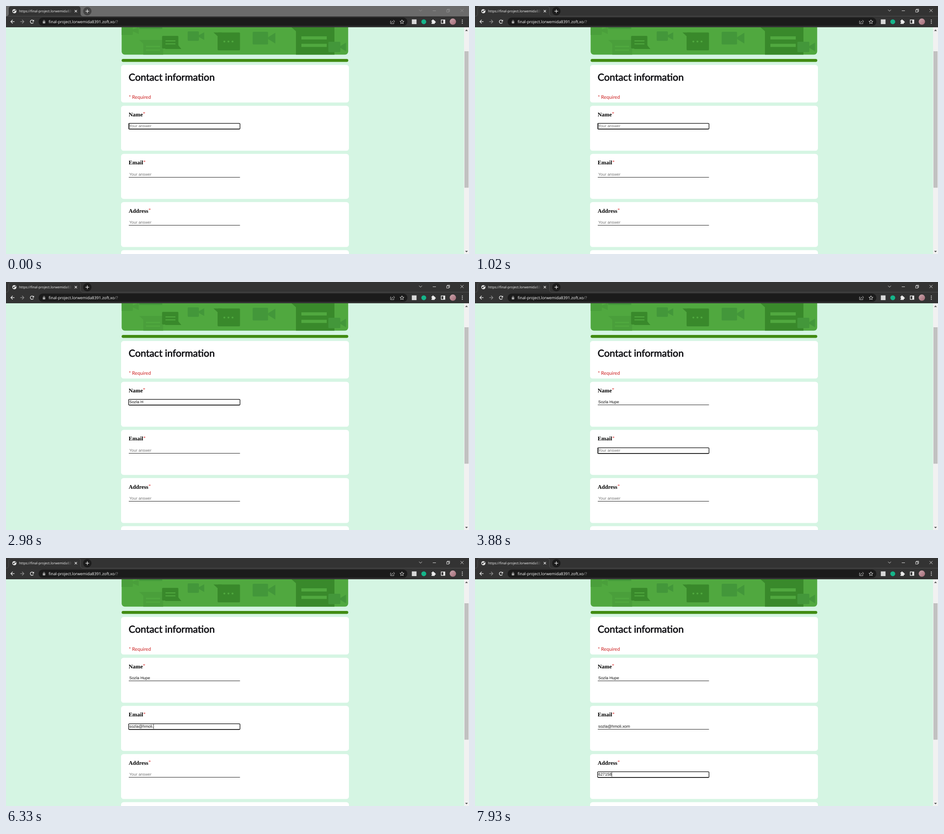
Recreate the animation shown at these times as an HTML page with a canvas. Size 1022 by 548 pixels, loop 8000 ms.

```html
<!DOCTYPE html>
<html lang="en">
<head>
<meta charset="utf-8">
<title>Contact form</title>
<style>
  html, body { margin: 0; width: 100%; height: 100%; overflow: hidden; background: #d5f5e3; }
  canvas, svg { position: absolute; left: 0; top: 0; width: 1022px; height: 548px; }
  text { white-space: pre; text-rendering: geometricPrecision; }
  .ui { font-family: "Open Sans", "Noto Sans", sans-serif; }
  .head { font-family: Lato, sans-serif; }
  .label { font: bold 12.48px "Liberation Serif", serif; }
  .star { font: 10.4px "Liberation Serif", serif; fill: #d93030; }
  .input { font: 8.89px "Liberation Sans", Arial, sans-serif; }
</style>
</head>
<body>
<canvas id="stage" width="1022" height="548"></canvas>
<svg id="copy" viewBox="0 0 1022 548">
  <defs>
    <linearGradient id="fade" gradientUnits="userSpaceOnUse" x1="130" x2="147" y1="0" y2="0">
      <stop offset="0" stop-color="#f2f2f2"/>
      <stop offset="1" stop-color="#f2f2f2" stop-opacity="0"/>
    </linearGradient>
  </defs>
  <text class="ui" x="29" y="14" font-size="7.5" fill="url(#fade)">https://final-project.lorwemida83</text>
  <text class="ui" x="94" y="38" font-size="8.85" fill="#fff">final-project.lorwemida8391.zoft.xo<tspan fill="#9c9c9c">/?</tspan></text>
  <text class="head" x="270.8" y="165.4" font-size="21.5" fill="#0c0c10" stroke="#0c0c10" stroke-width=".7">Contact information</text>
  <text class="head" x="271" y="205.3" font-size="10.67" fill="#cc1f1f">* Required</text>
</svg>
<script>
const LOOP = 8000;
const WAKE = 100;
const BLINK = 475;
const ROW = 106.4;
const INK = "#ededed";
const FRAME = "#333333";

// Each burst types its text evenly between two times.
const FIELDS = [
  { label: "Name", focus: -15, bursts: [["Sozla ", 1590, 2080], ["H", 2500], ["upe", 3570, 3720]] },
  { label: "Email", focus: 3810, bursts: [["sozl", 4470, 4770], ["a", 4940], ["@", 5270], ["hmoli", 5690, 6160], [".xom", 6330, 6750]] },
  { label: "Address", focus: 6800, bursts: [["627158", 7710, 7920]] }
];

const c = document.getElementById("stage").getContext("2d");
const svg = document.getElementById("copy");

function addText(cls, x, y, str) {
  const el = document.createElementNS("http://www.w3.org/2000/svg", "text");
  el.setAttribute("class", cls);
  el.setAttribute("x", x);
  el.setAttribute("y", y);
  el.textContent = str;
  svg.appendChild(el);
  return el;
}

FIELDS.forEach((f, i) => {
  const label = addText("label", 270.8, 243.9 + i * ROW, f.label);
  addText("star", 271 + label.getComputedTextLength(), 241.4 + i * ROW, "*");
  f.el = addText("input", 272, 268.2 + i * ROW, "");
});

function rect(x, y, w, h, color) {
  c.fillStyle = color;
  c.fillRect(x, y, w, h);
}

function round(x, y, w, h, r, color) {
  c.fillStyle = color;
  c.beginPath();
  c.roundRect(x, y, w, h, r);
  c.fill();
}

function disc(x, y, r, color) {
  c.fillStyle = color;
  c.beginPath();
  c.arc(x, y, r, 0, Math.PI * 2);
  c.fill();
}

function poly(color, ...pts) {
  c.fillStyle = color;
  c.beginPath();
  for (let i = 0; i < pts.length; i += 2) c.lineTo(pts[i], pts[i + 1]);
  c.fill();
}

function line(color, width, ...pts) {
  c.strokeStyle = color;
  c.lineWidth = width;
  c.beginPath();
  for (let i = 0; i < pts.length; i += 2) c.lineTo(pts[i], pts[i + 1]);
  c.stroke();
}

function arc(color, width, x, y, r, from, to) {
  c.strokeStyle = color;
  c.lineWidth = width;
  c.beginPath();
  c.arc(x, y, r, from, to);
  c.stroke();
}

function box(color, x, y, w, h) {
  c.strokeStyle = color;
  c.lineWidth = 0.9;
  c.strokeRect(x, y, w, h);
}

function cross(color, width, x, y, r) {
  line(color, width, x - r, y - r, x + r, y + r);
  line(color, width, x + r, y - r, x - r, y + r);
}

function arrow(color, x, dir) {
  const y = 34.5, tip = x + 4 * dir;
  line(color, 1.25, x - 4 * dir, y, tip, y);
  line(color, 1.25, x, y - 4, tip, y, x, y + 4);
}

function camera(x, y, w, h, color) {
  const body = w * 0.68, mid = y + h / 2;
  round(x, y, body, h, 2, color);
  poly(color, x + body, mid - 2, x + w, y + 2, x + w, y + h - 2, x + body, mid + 2);
}

// Speech bubble whose tail points out of the upper left corner.
function bubble(x, y, w, h, tail, color) {
  round(x, y, w, h, 2, color);
  poly(color, x - tail, y, x + tail, y, x + tail, y + tail * 1.8);
}

function bars(x, y, w, h, gap, color) {
  for (let i = 0; i < 2; i++) rect(x, y + i * gap, w, h, color);
}

function banner() {
  const faint = "#4a9f3b", mid = "#43973a", dark = "#39892b", pale = "#50a83f";
  c.save();
  c.beginPath();
  c.rect(0, 47, 1011, 70);
  c.clip();
  c.beginPath();
  c.roundRect(255.3, 20, 500, 87.5, 7);
  c.clip();
  rect(255, 47, 501, 61, "#50a83f");
  camera(252, 44, 41, 20, faint);
  rect(294, 47, 51, 3.5, mid);
  bubble(303, 75, 44, 40, 9, faint);
  bars(309, 88, 31, 3, 8, pale);
  round(344.5, 66, 36, 28, 2, dark);
  poly(dark, 378, 84, 387, 95, 350, 95);
  bars(352, 76, 22, 2.2, 6.5, pale);
  camera(401, 56, 36.5, 21, mid);
  bubble(467, 58.5, 49.5, 39.5, 9, dark);
  for (let i = 0; i < 3; i++) disc(482 + i * 9, 78.5, 2.1, pale);
  camera(544.5, 57, 50, 28, mid);
  bubble(640, 45, 85, 70, 12, dark);
  bars(652, 67, 56, 7, 16.5, pale);
  camera(711.5, 79, 39, 23, mid);
  c.restore();
}

function page() {
  rect(0, 47, 1022, 501, "#d5f5e3");
  banner();
  round(255.3, 117, 500.2, 6.6, 3.3, "#418b12");
  round(254, 130.3, 503, 83, 5.5, "#fff");
  for (let i = 0; i < 4; i++) round(254, 220.4 + i * ROW, 503, 99.4, 5.5, "#fff");
  rect(1011, 47, 11, 501, "#f1f1f1");
  rect(1012, 100, 9, 301.5, "#c1c1c1");
  for (const [y, dir] of [[53.7, -1], [542.6, 1]])
    poly("#505050", 1013.5, y - 1.6 * dir, 1016.5, y + 1.6 * dir, 1019.5, y - 1.6 * dir);
}

function tabStrip(active) {
  rect(0, 0, 1022, 23, active ? FRAME : "#6b6b6b");
  c.beginPath();
  c.moveTo(0, 22.5);
  c.arcTo(6, 22.5, 6, 0.8, 5);
  c.arcTo(6, 0.8, 164.5, 0.8, 5);
  c.arcTo(164.5, 0.8, 164.5, 22.5, 5);
  c.arcTo(164.5, 22.5, 1022, 22.5, 5);
  c.fillStyle = FRAME;
  c.fill();
  if (active) {
    c.lineTo(1022, 22.5);
    c.strokeStyle = "#5c5c5c";
    c.lineWidth = 0.7;
    c.stroke();
  }
  // globe
  disc(18.5, 11.5, 4.6, INK);
  disc(17, 12, 1.8, FRAME);
  disc(20.5, 9.7, 1.3, FRAME);

  cross(INK, 1.2, 154.2, 11.4, 2.5);
  disc(179.5, 11.5, 9.3, active ? "#1c1c1c" : "#454545");
  line(INK, 1.2, 175.5, 11.5, 183.5, 11.5);
  line(INK, 1.2, 179.5, 7.5, 179.5, 15.5);

  const ink = active ? INK : "#939393";
  line(ink, 0.9, 911.8, 8.3, 915, 11.5, 918.2, 8.3);
  line(ink, 0.9, 942, 10.5, 949, 10.5);
  box(ink, 974.3, 7, 4.9, 4.9);
  rect(972.4, 8.2, 5.6, 5.6, active ? FRAME : "#6b6b6b");
  box(ink, 972.8, 8.6, 4.8, 4.8);
  cross(ink, 0.9, 1006.6, 10, 3.3);
}

function toolbar() {
  rect(0, 23, 1022, 24, FRAME);
  round(72, 25.6, 814, 18.2, 9.1, "#1b1b1b");
  arrow(INK, 14.7, -1);
  arrow("#8f8f8f", 35.6, 1);
  arc(INK, 1.3, 57.3, 34.6, 3.7, 0.5, 5.5);
  poly(INK, 61.8, 30.2, 61.8, 34.2, 57.8, 34.2);
  // lock
  round(81.2, 33.6, 5.4, 5, 0.8, "#a9a9a9");
  arc("#a9a9a9", 0.9, 83.9, 33, 1.7, Math.PI, 0);
  // share
  line("#d0d0d0", 0.9, 850, 33, 848.8, 33, 848.8, 39, 856.2, 39, 856.2, 37.3);
  arc("#d0d0d0", 0.9, 855, 37.5, 3.8, Math.PI, Math.PI * 1.5);
  line("#d0d0d0", 0.9, 855, 31, 858, 34, 855, 36.8);
  // bookmark star
  const star = [];
  for (let i = 0; i <= 10; i++) {
    const a = i * Math.PI / 5 - Math.PI / 2, r = i % 2 ? 2.1 : 4.7;
    star.push(874 + r * Math.cos(a), 35.2 + r * Math.sin(a));
  }
  line(INK, 0.9, ...star);
  // extensions
  rect(895.8, 29.6, 10.4, 10.4, "#d8d8d8");
  disc(922.2, 34.8, 5.4, "#15b58a");
  round(939.2, 31.8, 7.4, 7.6, 0.8, INK);
  disc(942.6, 31.4, 1.6, INK);
  disc(947, 35.4, 1.6, INK);
  disc(939.3, 35.8, 1.2, FRAME);
  rect(960, 30, 9.4, 9.2, INK);
  rect(961.3, 31.4, 4, 6.4, FRAME);
  const g = c.createLinearGradient(980, 28, 993, 42);
  g.addColorStop(0, "#c9a4ab");
  g.addColorStop(1, "#a36a76");
  disc(986.4, 34.6, 7, g);
  for (let i = -1; i <= 1; i++) disc(1007.3, 34.6 + i * 3.6, 1.05, INK);
}

function typing(field, t) {
  let text = "", last = field.focus;
  for (const [str, from, to = from] of field.bursts) {
    if (t < from) break;
    const step = (to - from) / Math.max(1, str.length - 1);
    const extra = step ? Math.min(str.length - 1, Math.floor((t - from) / step)) : 0;
    text += str.slice(0, extra + 1);
    last = from + extra * step;
  }
  return { text, caret: Math.floor((t - last) / BLINK) % 2 === 0 };
}

function fields(t) {
  const focused = FIELDS.filter(f => f.focus <= t).length - 1;
  c.font = '8.89px "Liberation Sans", Arial, sans-serif';
  FIELDS.forEach((f, i) => {
    const { text, caret } = typing(f, t);
    const base = Math.round(271.2 + i * ROW);
    const shown = text || "Your answer";
    if (f.el.textContent !== shown) f.el.textContent = shown;
    f.el.style.fill = text ? "#111" : "#757575";
    rect(271, base, 245.5, 1, "#262626");
    if (i !== focused) return;
    c.strokeStyle = "#0a0a0a";
    c.lineWidth = 1.3;
    c.beginPath();
    c.roundRect(270.6, base - 11.7, 245.9, 12.7, 1.5);
    c.stroke();
    if (caret) rect(272 + c.measureText(text).width, base - 10.8, 0.8, 10.2, "#000");
  });
}

const start = performance.now();

function frame() {
  const t = (performance.now() - start) % LOOP;
  page();
  tabStrip(t >= WAKE);
  toolbar();
  fields(t);
  requestAnimationFrame(frame);
}
frame();
</script>
</body>
</html>
```
